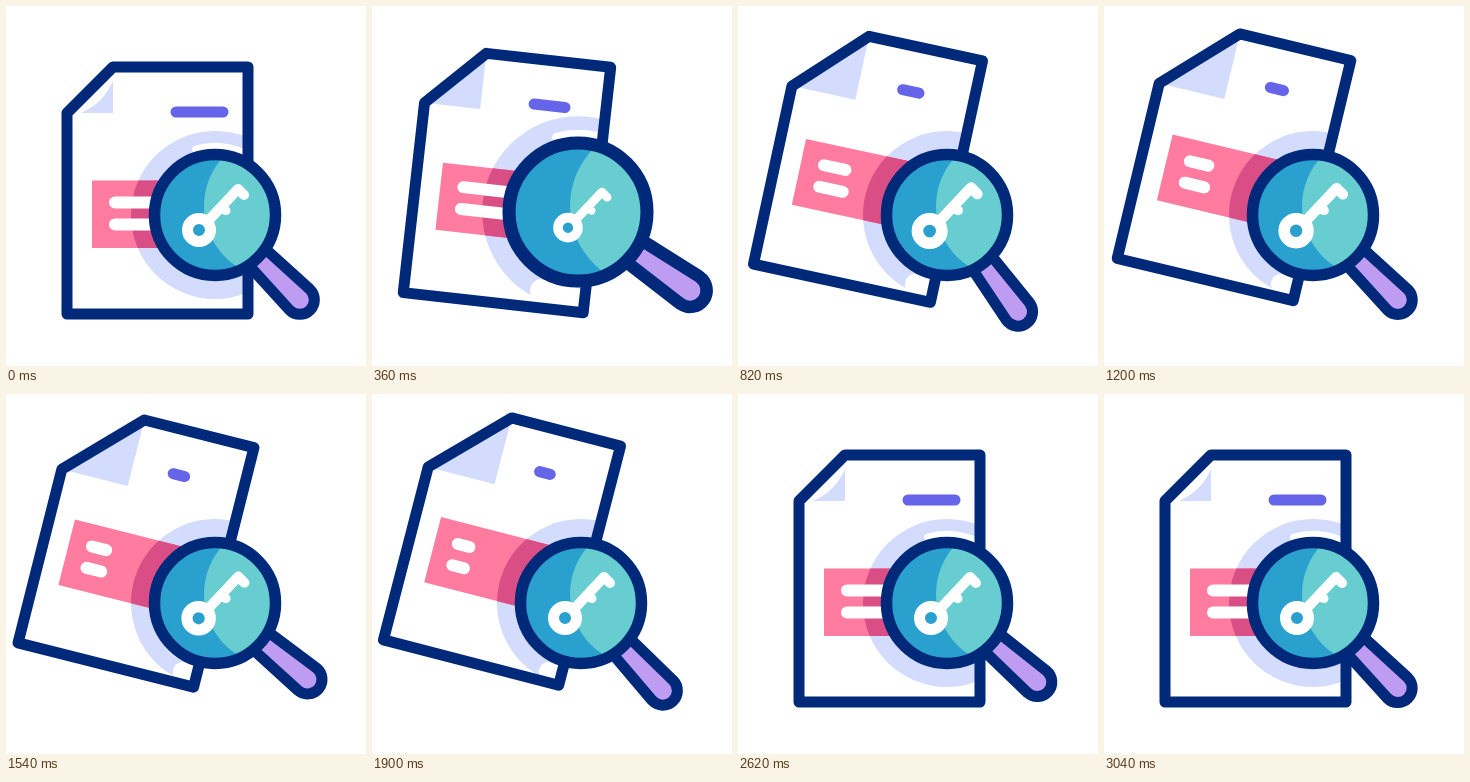
An HTML page with a canvas that plays this animation: 360 by 360 pixels, repeating every 3060 ms.

```html
<!DOCTYPE html>
<html lang="en">
<head>
<meta charset="utf-8">
<title>Document search</title>
<style>
  html, body { margin: 0; width: 100%; height: 100%; overflow: hidden; background: #fff; }
  canvas { display: block; width: 360px; height: 360px; }
</style>
</head>
<body>
<canvas id="stage"></canvas>
<script>
const LOOP = 3060;
const NAVY = '#00297a', PALE = '#d3dcfd', PINK = '#ff7ba0', ROSE = '#d94f85',
      INDIGO = '#6664e8', BLUE = '#2aa0ce', TEAL = '#68cdd1', LILAC = '#be9cf2';

// Rows are [time, value, ...]
const paperKeys = [
  [0, 0, 151.5, 184.5], [360, .44, 135, 174], [540, .8, 130.5, 159],
  [820, .84, 130, 156.5], [1200, .93, 130, 153.5], [1900, 1, 130, 149],
  [1980, 1, 130, 148.5], [2160, .62, 130, 164], [2260, .3, 134, 177.5],
  [2460, 0, 151.5, 184.5], [LOOP, 0, 151.5, 184.5]
];
const handleKeys = [
  [0, 45], [360, 35], [480, 21], [540, 23], [810, 53.8], [1070, 33.6],
  [1200, 45], [1330, 50], [1590, 38.5], [1840, 48.5], [1900, 47], [2110, 39],
  [2260, 46], [2390, 56], [2620, 41.2], [2860, 49.5], [LOOP, 45]
];
const lensKeys = [[0, 1], [360, 1.14], [480, 1.14], [700, 1], [LOOP, 1]];
const keyKeys = [[0, 1], [360, .87], [700, 1.05], [820, 1.06], [1200, 1.04], [1900, 1], [LOOP, 1]];
const lineKeys = [
  [0, 75, 75], [360, 50, 50], [820, 22, 24], [1200, 19, 20], [1900, 12, 12],
  [2140, 12, 12], [2260, 38, 13], [2420, 70, 50], [2600, 75, 75], [LOOP, 75, 75]
];

// Smooth interpolation that never overshoots a key
function sample(keys, t, col = 1) {
  let i = 0;
  while (i < keys.length - 2 && t >= keys[i + 1][0]) i++;
  const slope = k => k < 0 || k > keys.length - 2 ? 0 :
    (keys[k + 1][col] - keys[k][col]) / (keys[k + 1][0] - keys[k][0]);
  const tangent = k => {
    const a = slope(k - 1), b = slope(k);
    return a * b <= 0 ? 0 : 2 * a * b / (a + b);
  };
  const a = keys[i], b = keys[i + 1], h = b[0] - a[0], u = (t - a[0]) / h;
  const w = u * u * (3 - 2 * u);
  return a[col] * (1 - w) + b[col] * w +
    h * u * (1 - u) * ((1 - u) * tangent(i) - u * tangent(i + 1));
}

const canvas = document.getElementById('stage');
const ctx = canvas.getContext('2d');
const dpr = window.devicePixelRatio || 1;
canvas.width = canvas.height = 360 * dpr;
const rad = deg => deg * Math.PI / 180;

function fill(path, color) {
  ctx.fillStyle = color;
  ctx.fill(path);
}

function stroke(path, color, width) {
  ctx.strokeStyle = color;
  ctx.lineWidth = width;
  ctx.stroke(path);
}

function poly(points, closed) {
  const path = new Path2D();
  points.forEach(([x, y]) => path.lineTo(x, y));
  if (closed) path.closePath();
  return path;
}

function arc(x, y, r, from = 0, to = 360) {
  const path = new Path2D();
  path.arc(x, y, r, rad(from), rad(to));
  return path;
}

function group(draw) {
  ctx.save();
  draw();
  ctx.restore();
}

function drawPaper(t, lens) {
  const p = sample(paperKeys, t), cx = sample(paperKeys, t, 2), cy = sample(paperKeys, t, 3);
  const tilt = rad(14.5 * p), cut = 46 + 22.5 * p;
  const L = -90.5, T = -123.5, R = 90.5, B = 123.5;
  const sheet = poly([[L, T + cut], [L + cut, T], [R, T], [R, B], [L, B]], true);
  const band = new Path2D();
  band.rect(-65.5, -10, 131, 67.5);

  group(() => {
    ctx.translate(cx, cy);
    ctx.rotate(tilt);
    fill(sheet, '#fff');

    // Halo stays with the lens, so undo the sheet's pose inside its clip
    const inLens = draw => group(() => {
      ctx.rotate(-tilt);
      ctx.translate(lens.x - cx, lens.y - cy);
      ctx.scale(lens.s, lens.s);
      draw();
    });
    const halo = arc(0, 0, 84);

    group(() => {
      ctx.clip(sheet);
      inLens(() => {
        fill(halo, PALE);
        if (p < .6) stroke(arc(0, 0, 68, -106, -65), '#fff', 8);
        if (p > .25) stroke(arc(0, 0, 76, 93, 115), '#fff', 20);
      });

      const inset = 14 * Math.max(0, 1 - p / .4);
      const x = L + cut, y = T + cut, leg = cut - inset;
      const mid = leg / 2 - inset * .45;
      const fold = new Path2D();
      fold.moveTo(x, y);
      fold.lineTo(x - leg, y);
      fold.quadraticCurveTo(x - mid, y - mid, x, y - leg);
      fill(fold, PALE);

      fill(band, PINK);
      group(() => {
        ctx.clip(band);
        inLens(() => fill(halo, ROSE));
      });
    });

    [1, 2].forEach(n => {
      const y = 22 * n - 10;
      stroke(poly([[-42.5, y], [-42.5 + sample(lineKeys, t, n), y]]), '#fff', 12);
    });
    stroke(poly([[18.5, -78.5], [65.5 - 36 * p, -78.5]]), INDIGO, 11);
    stroke(sheet, NAVY, 11);
  });
}

function drawHandle(t, lens) {
  const grip = new Path2D();
  grip.moveTo(56, -11.5);
  grip.lineTo(119, -14.5);
  grip.arc(120, 0, 14.5, -Math.PI / 2, Math.PI / 2);
  grip.lineTo(56, 11.5);
  grip.closePath();
  group(() => {
    ctx.translate(lens.x, lens.y);
    ctx.rotate(rad(sample(handleKeys, t)));
    ctx.scale(lens.s, lens.s);
    fill(grip, LILAC);
    stroke(grip, NAVY, 11);
  });
}

function drawLens(lens) {
  const glass = arc(lens.x, lens.y, 60.5 * lens.s);
  fill(glass, BLUE);
  group(() => {
    ctx.clip(glass);
    fill(arc(198 + 72 * lens.s, 200, 72 * lens.s), TEAL);
  });
  stroke(glass, NAVY, 11.5 * lens.s);
}

function drawKey(t) {
  const s = sample(keyKeys, t);
  group(() => {
    ctx.translate(216, 206);
    ctx.scale(s, s);
    stroke(arc(-23, 18, 11.5), '#fff', 11);
    stroke(poly([[-14, 9], [16, -23], [22, -17]]), '#fff', 10);
    stroke(poly([[-2, -4], [4, -1.5]]), '#fff', 9);
  });
}

function draw(t) {
  const s = sample(lensKeys, t), shift = (s - 1) / .14 * 3;
  const lens = { x: 209 - shift, y: 209 - shift, s };
  ctx.setTransform(dpr, 0, 0, dpr, 0, 0);
  ctx.fillStyle = '#fff';
  ctx.fillRect(0, 0, 360, 360);
  ctx.lineJoin = 'round';
  ctx.lineCap = 'round';
  drawPaper(t, lens);
  drawHandle(t, lens);
  drawLens(lens);
  drawKey(t);
}

const start = performance.now();
function tick() {
  draw((performance.now() - start) % LOOP);
  requestAnimationFrame(tick);
}
tick();
</script>
</body>
</html>
```
